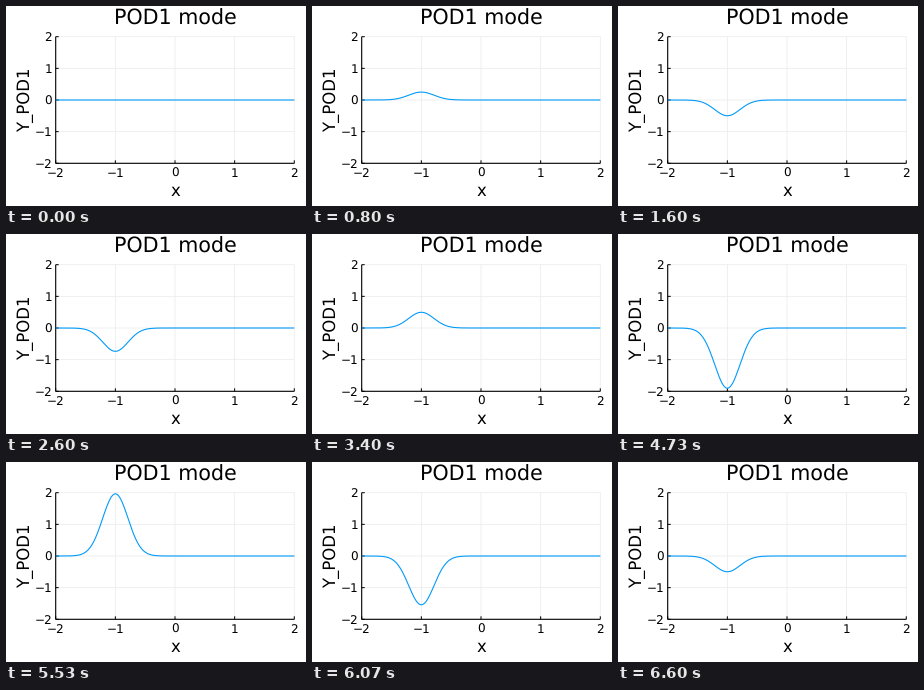
Write a matplotlib script that moves like this. It is 300x200 px and loops after 6670 ms.

```python
import numpy as np
import matplotlib.pyplot as plt
from matplotlib.animation import FuncAnimation

W, H, DPI = 300, 200, 100
FRAMES, FPS = 100, 15
PERIOD = 25                      # frames per oscillation
AMP, CENTER, WIDTH = 2.0, -1.0, 0.3
LEFT, RIGHT, TOP, BOTTOM = 49.7, 288.3, 30.7, 157.3
PT = 72 / DPI                    # points per pixel

plt.rcParams["font.family"] = "DejaVu Sans"
plt.rcParams["text.hinting"] = "none"

fig = plt.figure(figsize=(W / DPI, H / DPI), dpi=DPI, facecolor="white")
ax = fig.add_axes([LEFT / W, 1 - BOTTOM / H,
                   (RIGHT - LEFT) / W, (BOTTOM - TOP) / H])
ax.set(xlim=(-2, 2), ylim=(-2, 2))
ax.axis("off")


def px(x):
    return LEFT + (x + 2) / 4 * (RIGHT - LEFT)


def py(y):
    return BOTTOM - (y + 2) / 4 * (BOTTOM - TOP)


def label(x, y, s, size, **kw):
    style = dict(ha="center", va="baseline") | kw
    fig.text(x / W, 1 - y / H, s, fontsize=size * PT, **style)


def stroke(xs, ys, color, width, z):
    return ax.plot(xs, ys, color=color, lw=width * PT, zorder=z, snap=False,
                   clip_on=False, solid_capstyle="butt")[0]


tick_x = 3 * 4 / (RIGHT - LEFT)
tick_y = 3 * 4 / (BOTTOM - TOP)
for v in range(-2, 3):
    stroke([v, v], [-2, 2], "#ececec", 0.8, 1)
    stroke([-2, 2], [v, v], "#ececec", 0.8, 1)
    stroke([v, v], [-2, -2 + tick_y], "black", 1, 2)
    stroke([-2, -2 + tick_x], [v, v], "black", 1, 2)
    name = str(v).replace("-", "\u2212")
    label(px(v), 171, name, 12)
    label(46, py(v) + 4.5, name, 12, ha="right")
stroke([-2, -2], [-2, 2], "black", 1.1, 2)
stroke([-2, 2], [-2, -2], "black", 1.1, 2)

label(px(0), 18.5, "POD1 mode", 20.7)
label(px(0), 190, "x", 16.5)
label(19.5, py(0), "Y_POD1", 16.5, va="center", rotation=90)

x = np.linspace(-2, 2, 401)
mode = AMP * np.exp(-((x - CENTER) / WIDTH) ** 2)
curve = stroke(x, 0 * x, "#009afa", 1.1, 3)


def update(i):
    curve.set_ydata(mode * np.sin(2 * np.pi * i / PERIOD))
    return curve,


anim = FuncAnimation(fig, update, frames=FRAMES, interval=1000 / FPS,
                     repeat=True, repeat_delay=0)
plt.show()
```
